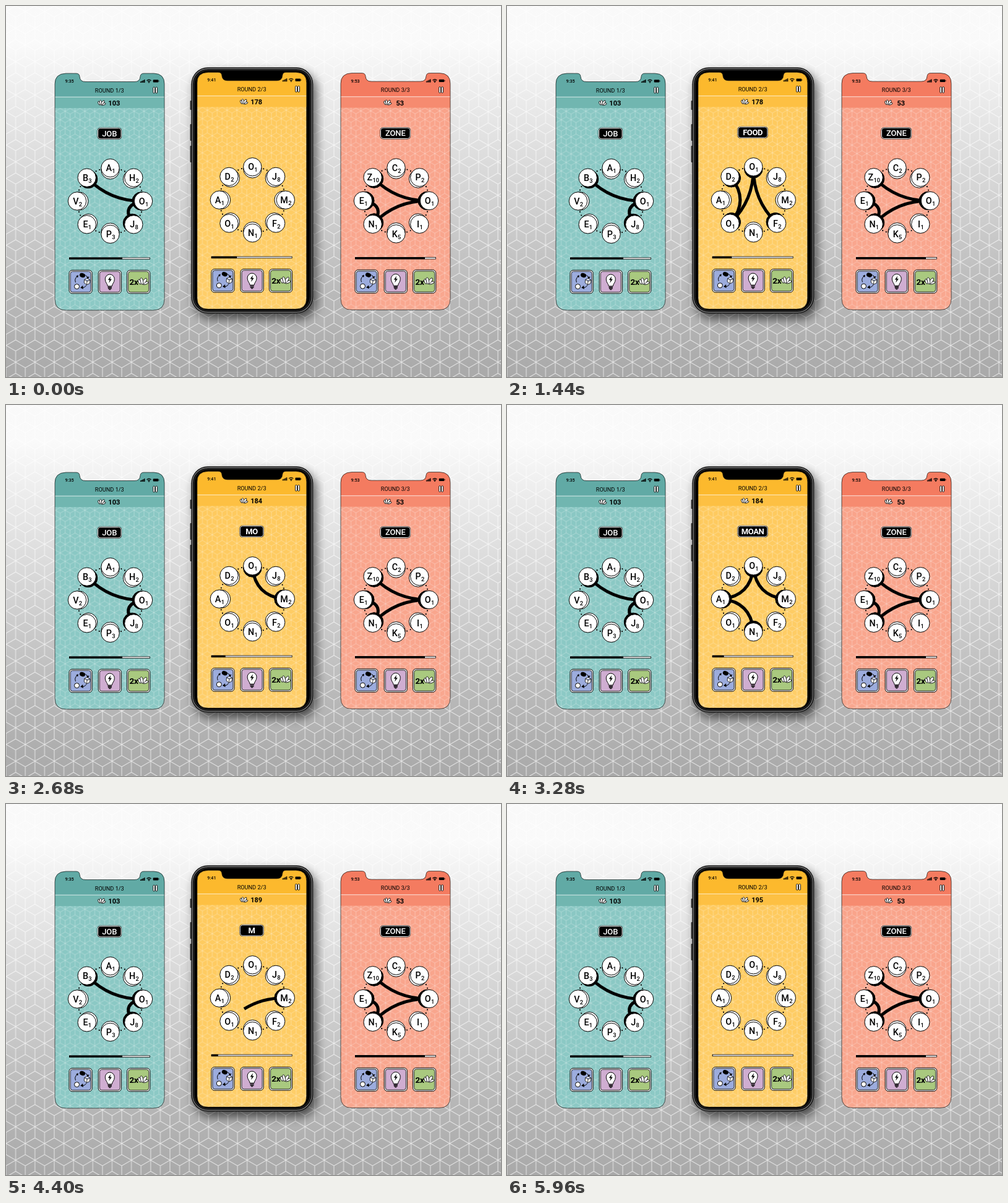
An HTML page that plays this animation: 800 px wide and 600 px high, repeating every 6 s.

```html
<!DOCTYPE html>
<html lang="en">
<head>
<meta charset="utf-8">
<title>Word ring game</title>
<style>
  html, body { margin: 0; width: 100%; height: 100%; overflow: hidden; background: #fff; }
  svg { display: block; width: 800px; height: 600px; }
  text { font-family: Roboto, "Liberation Sans", sans-serif; font-stretch: 88%; }
  .mid { text-anchor: middle; }
</style>
</head>
<body>
<svg id="stage" viewBox="0 0 800 600"></svg>
<script>
const LOOP = 6000, STEP = 40;
const PITCH = 260, DRAW = 200, FADE = 180, PULSE = 240;
const RING = { x: 168.5, y: 315.5, r: 53.5 };
const SCREEN = 'M97 109H113Q118.500 109 119 114Q119.500 122.500 128 122.500H208Q216.500 122.500 217 114' +
  'Q217.500 109 223 109H239Q256 109.500 256 126V474Q256 492 238 492H97Q79 492 79 474V126Q79 109.500 97 109Z';

// All phones share the left phone's coordinates and are shifted by dx, dy.
const phones = [
  { dx: 0, dy: 0, time: '9:35', round: 'ROUND 1/3', score: 103, bar: 86,
    head: '#61aaa5', strip: '#71b6b0', body: '#89c7c3', low: '#8cc9c5',
    tiles: 'A1 H2 O1 J8 P3 E1 V2 B3', word: 'JOB', path: [3, 2, 7] },
  { dx: 229.8, dy: -1.8, time: '9:41', round: 'ROUND 2/3', score: 178, bar: 41, live: true,
    head: '#fcb92d', strip: '#fdc043', body: '#fec95c', low: '#fece69',
    tiles: 'O1 J8 M2 F2 N1 O1 A1 D2', word: '', path: [] },
  { dx: 462, dy: -.5, time: '9:53', round: 'ROUND 3/3', score: 53, bar: 113,
    head: '#f47b60', strip: '#f68b70', body: '#f9a38a', low: '#f9a78f',
    tiles: 'C2 P2 O1 I1 K5 N1 E1 Z10', word: 'ZONE', path: [7, 2, 5, 6] }
];

const turns = [
  { start: 560, fade: 1800, word: 'FOOD', path: [3, 0, 5, 7], score: 184 },
  { start: 2360, fade: 3600, word: 'MOAN', path: [2, 0, 6, 4], score: 189 },
  { start: 4200, fade: 5440, word: 'MOOD', path: [2, 5, 0, 7], score: 195 }
];

const clamp = v => Math.max(0, Math.min(1, v));
const spot = (i, r = RING.r) => {
  const a = i * Math.PI / 4 - Math.PI / 2;
  return [RING.x + r * Math.cos(a), RING.y + r * Math.sin(a)];
};

// Tumbling-block pattern with edge length s.
function cubes(id, s, color, width, opacity) {
  const w = s * Math.sqrt(3), h = w / 2;
  const d = `M${h} 0L${w} ${s / 2}V${s * 1.5}L${h} ${s * 2}L0 ${s * 1.5}V${s / 2}Z
    M${h} ${s}V${s * 3}M0 ${s / 2}L${h} ${s}L${w} ${s / 2}
    M0 ${s * 2.5}L${h} ${s * 2}L${w} ${s * 2.5}M0 0V${s / 2}M${w} 0V${s / 2}
    M0 ${s * 2.5}V${s * 3}M${w} ${s * 2.5}V${s * 3}`;
  return `<pattern id="${id}" width="${w}" height="${s * 3}" patternUnits="userSpaceOnUse">
    <path d="${d}" fill="none" stroke="${color}" stroke-width="${width}" opacity="${opacity}"/></pattern>`;
}

// Wider spans bend closer to the ring's centre.
function link(a, b) {
  const [ax, ay] = spot(a, RING.r - 3), [bx, by] = spot(b, RING.r - 3);
  const gap = Math.abs(a - b), pull = .4 + .2 * Math.min(gap, 8 - gap);
  const cx = (ax + bx) / 2 * (1 - pull) + RING.x * pull;
  const cy = (ay + by) / 2 * (1 - pull) + RING.y * pull;
  return `M${ax} ${ay}Q${cx} ${cy} ${bx} ${by}`;
}

const links = (path, grown) => path.slice(1).map((b, i) => {
  const g = grown(i + 1);
  return g > 0 ? `<path d="${link(path[i], b)}" pathLength="1" stroke-dasharray="${g} 2"/>` : '';
}).join('');

const disc = (i, r, fill) => {
  const [x, y] = spot(i, r);
  return `<circle cx="${x}" cy="${y}" r="14.700" fill="${fill}" stroke="#000"/>`;
};

function tile(name, i) {
  const [x, y] = spot(i);
  return disc(i, RING.r, '#fff') + `<text class="mid" x="${x + .6}" y="${y + 5}" font-size="14.300"
    font-weight="500">${name[0]}<tspan font-size="9.300" dx=".3" dy="3">${name.slice(1)}</tspan></text>`;
}

function badge(word, weight = 500) {
  if (!word) return '';
  const w = word.length < 3 || word === 'JOB' ? 39 : word.length === 3 ? 44 : 49, x = 167.3 - w / 2;
  return `<rect x="${x - .3}" y="196.500" width="${w + .6}" height="19.400" rx="5.500"/>
    <rect x="${x + .7}" y="197.500" width="${w - 1.4}" height="17.400" rx="4.500" stroke="#fff"/>
    <text class="mid" x="167.300" y="210.900" font-size="13" font-weight="${weight}" fill="#fff"
      letter-spacing="${weight > 500 ? -.4 : -.1}">${word}</text>`;
}

const wings = (x, y, k) => `<g transform="translate(${x} ${y}) scale(${k})" fill="#fff" stroke="#000" stroke-width="${.8 / k}">
  <ellipse cx="10" cy="7" rx="4" ry="1.700" transform="rotate(-18 10 7)"/>
  <ellipse cx="8.600" cy="4.400" rx="4.600" ry="1.900" transform="rotate(-55 8.600 4.400)"/>
  <ellipse cx="4.800" cy="4.300" rx="1.900" ry="4.400" transform="rotate(-8 4.800 4.300)"/>
  <ellipse cx="2" cy="5.200" rx="1.500" ry="3.500" transform="rotate(-20 2 5.200)"/></g>`;

const frame = (x, fill) => `<rect x="${x}" y="427.300" width="37.200" height="37.600" rx="5" fill="#f4f4f4" stroke="#000"/>
  <rect x="${x + 2.1}" y="429.400" width="33" height="33.400" rx="3.500" fill="${fill}" stroke="#000" stroke-width=".8"/>`;

const shuffleIcon = `<g fill="none" stroke="#000">
  <path d="M112.500 447Q110 441 115.500 437M128.500 435.500Q132 437 132 440.500M130 451.500Q127 456.500 121 455.500"/>
  <path d="M113.500 437l3-1.500-.5 3.500zM124 452.500l-3.500 3 4 2zM130.500 438.500l3.800-.5-2 3z" fill="#000" stroke-width=".5"/>
  <ellipse cx="123.500" cy="435.500" rx="4.200" ry="2.900" fill="#000" transform="rotate(20 123.500 435.500)"/>
  <circle cx="114.500" cy="453.700" r="4" fill="#fff"/>
  <path d="M131 440.500l5 2.700-1 5.600-4.600 2-4.200-3.200.5-5zM126.700 442.600l4.300 2.400 5-1.800M131 445l-.6 5.800" fill="#fff" stroke-width=".8"/></g>`;

const bulbIcon = `<g stroke="#000" stroke-linejoin="round">
  <path d="M164.300 453C164.300 449.500 160.300 447.500 160.300 441.800A7.500 7.800 0 0 1 175.300 441.800C175.300 447.500 171.300 449.500 171.300 453Z" fill="#fff"/>
  <path d="M164.500 454.700H171M164.900 456.800H170.700" stroke-width="1.400"/>
  <path d="M166.300 458.600H169.300" stroke-width="1.200"/>
  <path d="M169 437.500L165 443H167.600L166.500 447.500L170.700 441.700H168.100Z" stroke-width=".2"/></g>`;

const buttons = frame(102, '#9cacdd') + shuffleIcon + frame(149.2, '#cfadd1') + bulbIcon +
  frame(195.6, '#a9c97f') + wings(213.5, 439.8, 1.2) +
  `<text x="199.500" y="451.300" font-size="13.500" font-weight="700" letter-spacing="-.3">2x</text>`;

const status = p => `<text x="95.500" y="124.200" font-size="7.200" font-weight="500">${p.time}</text>
  ${[0, 1, 2, 3].map(i => `<rect x="${217 + i * 2}" y="${122 - i}" width="1.500" height="${2 + i}"/>`).join('')}
  <g fill="none" stroke="#000" stroke-width="1.200"><path d="M227.500 120.800Q231 117.700 234.500 120.800M229.100 122.500Q231 120.800 232.900 122.500"/></g>
  <circle cx="231" cy="123.700" r=".9"/>
  <rect x="237.700" y="119.200" width="8.600" height="4.400" rx="1"/><rect x="246.700" y="120.500" width=".8" height="1.800"/>`;

const scoreText = n => `<text class="mid" x="174.800" y="161" font-size="11" font-weight="700">${n}</text>`;

function phone(p, n) {
  const names = p.tiles.split(' ');
  const id = key => p.live ? ` id="${key}"` : '';
  const bars = [237.8, 241.8].map(x =>
    `<rect x="${x}" y="131.300" width="2.800" height="9.600" rx="1" fill="#fff" stroke="#000" stroke-width=".9"/>`).join('');
  return `<g transform="translate(${p.dx} ${p.dy})">
    <linearGradient id="body${n}" x2="0" y2="1"><stop stop-color="${p.body}"/><stop offset="1" stop-color="${p.low}"/></linearGradient>
    <g clip-path="url(#screen)">
      <rect x="78" y="108" width="180" height="385" fill="url(#body${n})"/>
      <rect x="78" y="164" width="180" height="329" fill="url(#mesh)"/>
      <rect x="78" y="108" width="180" height="39" fill="${p.head}"/>
      <rect x="78" y="147" width="180" height="18" fill="${p.strip}"/>
      <rect x="78" y="146.600" width="180" height="1.200" fill="#fff" opacity=".6"/>
    </g>
    <path d="${SCREEN}" fill="none" stroke="#000" stroke-width=".8" stroke-opacity=".8"/>
    ${status(p)}
    <text class="mid" x="167.300" y="139.500" font-size="9.200">${p.round}</text>${bars}
    ${wings(148.6, 152.4, .9)}<g${id('score')}>${scoreText(p.score)}</g>
    <g${id('badge')}>${badge(p.word)}</g>
    <circle cx="${RING.x}" cy="${RING.y}" r="${RING.r}" fill="none" stroke="#000" stroke-width="2.200"
      stroke-linecap="round" stroke-dasharray="0 6"/>
    ${names.map((_, i) => disc(i, RING.r - 3.2, '#fff')).join('')}
    <g${id('trail')}>${trail(p.path)}</g>
    ${names.map(tile).join('')}
    <rect x="102.400" y="407" width="130" height="2.600" fill="#fff" stroke="#000" stroke-width=".8"/>
    <rect${id('bar')} x="102" y="406.700" width="${p.bar}" height="3.200"/>
    ${buttons}</g>`;
}

function trail(path, grown = () => 1) {
  return path.map((t, i) => grown(i) >= 1 ? disc(t, RING.r - 3.2, '#000') : '').join('') +
    `<g fill="none" stroke="#000" stroke-width="5">${links(path, grown)}</g>`;
}

const bezel = `<rect x="304" y="107" width="198" height="399" rx="28" opacity=".6" filter="url(#blur)"/>
  <g fill="#333">${[[153, 15], [191, 27], [226, 27]].map(([y, h]) =>
    `<rect x="297.500" y="${y}" width="3" height="${h}" rx="1"/>`).join('')}</g>
  <rect x="299.300" y="99.300" width="197" height="398" rx="27" fill="#111"/>
  <rect x="301.300" y="101.300" width="193" height="394" rx="25" fill="none" stroke="#808080" stroke-width="1.200"/>
  <rect x="304" y="103.800" width="187.600" height="389" rx="23" fill="#000" stroke="#2e2e2e"/>`;

const stage = document.getElementById('stage');
stage.innerHTML = `<defs>
  <linearGradient id="sky" x2="0" y2="1"><stop stop-color="#f9f9f9"/><stop offset=".1" stop-color="#fafafa"/>
    <stop offset=".25" stop-color="#ebebeb"/><stop offset=".5" stop-color="#d4d4d4"/>
    <stop offset=".8" stop-color="#b7b7b7"/><stop offset="1" stop-color="#a9a9a9"/></linearGradient>
  ${cubes('wall', 18, '#fff', 1, .7)}${cubes('mesh', 9.2, '#fff', .7, .42)}
  <clipPath id="screen"><path d="${SCREEN}"/></clipPath>
  <filter id="blur" x="-20%" y="-20%" width="140%" height="140%"><feGaussianBlur stdDeviation="8"/></filter></defs>
  <rect width="800" height="600" fill="url(#sky)"/><rect width="800" height="600" fill="url(#wall)"/>
  ${phone(phones[0], 0)}${phone(phones[2], 2)}${bezel}${phone(phones[1], 1)}`;

const [scoreEl, badgeEl, trailEl, barEl] = ['score', 'badge', 'trail', 'bar'].map(k => document.getElementById(k));

function render(t) {
  barEl.setAttribute('width', 41.3 * (1 - t / LOOP));

  const turn = turns.find(w => t >= w.start && t < w.fade + FADE);
  if (turn) {
    const grown = i => clamp((t - turn.start - i * PITCH + DRAW) / DRAW);
    const alpha = 1 - clamp((t - turn.fade) / FADE);
    const count = turn.path.filter((_, i) => grown(i) >= 1).length;
    badgeEl.innerHTML = badge(turn.word.slice(0, count), 700);
    trailEl.innerHTML = trail(turn.path, grown);
    badgeEl.setAttribute('opacity', alpha);
    trailEl.setAttribute('opacity', alpha);
  } else {
    badgeEl.innerHTML = trailEl.innerHTML = '';
  }

  const won = turns.filter(w => t >= w.fade).pop();
  const swell = won ? 1 + .32 * Math.sin(Math.PI * clamp((t - won.fade) / PULSE)) : 1;
  scoreEl.innerHTML = scoreText(won ? won.score : phones[1].score);
  scoreEl.setAttribute('transform', `translate(174.800 157.300) scale(${swell}) translate(-174.800 -157.300)`);
}

const begin = performance.now();
function tick() {
  const t = (performance.now() - begin) % LOOP;
  render(Math.floor(t / STEP) * STEP);
  requestAnimationFrame(tick);
}
tick();
</script>
</body>
</html>
```
